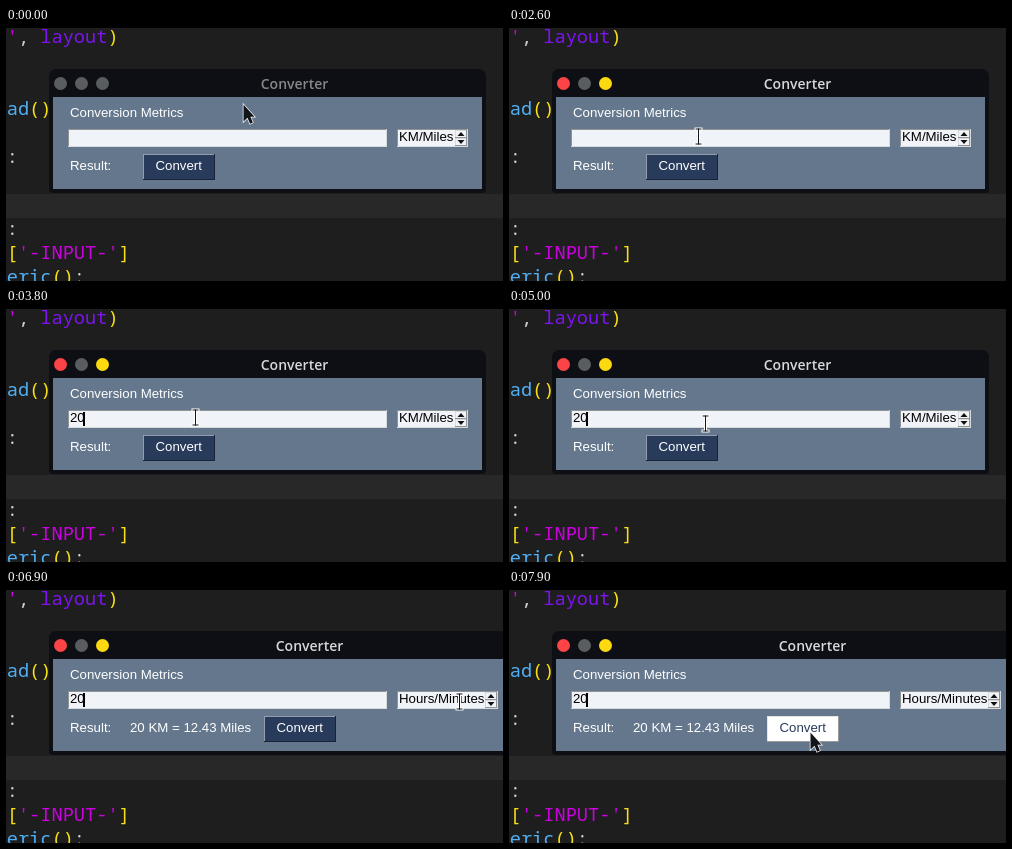
Write an HTML page with a canvas that moves like this. It is 497x253 px and loops after 8 s.

```html
<!DOCTYPE html>
<html lang="en">
<head>
<meta charset="utf-8">
<title>Converter</title>
<style>
html, body { margin: 0; width: 100%; height: 100%; overflow: hidden; background: #1e1e1e; }
canvas { display: block; }
</style>
</head>
<body>
<canvas id="stage" width="497" height="253"></canvas>
<script>
const ctx = document.getElementById('stage').getContext('2d');
const LOOP = 8000, STEP = 100;
const UI_FONT = '13.25px "Liberation Sans", Arial, sans-serif';
const CODE_FONT = '500 18.667px "Noto Sans Mono", monospace';
const TITLE_FONT = '600 14px "Open Sans", sans-serif';
const FIELD = '#f0f3f7', FIELD_DARK = '#909294', FIELD_LIGHT = '#d8dbde', NAVY = '#283b5b';

// The view starts one column into the code, so each line's first character is cut off
const CODE = `r', layout)


oad()

):


 :
 ['-INPUT-']
meric():`.split('\n');

const moves = [
  { from: 0, to: 100, x: 265, y: 68 },
  { from: 200, to: 800, x: 189, y: 108 },
  { from: 4200, to: 4400, x: 198, y: 91 },
  { from: 4600, to: 5300, x: 194, y: 132 },
  { from: 5400, to: 5800, x: 312, y: 113 },
  { from: 5800, to: 6400, x: 453, y: 111 },
  { from: 6900, to: 7700, x: 353, y: 145 },
  { from: 7700, to: 7900, x: 301, y: 142 }
];

function pointerAt(t) {
  let x = 237, y = 76;
  for (const move of moves) {
    const f = Math.min(1, Math.max(0, (t - move.from) / (move.to - move.from)));
    x += (move.x - x) * f;
    y += (move.y - y) * f;
  }
  return [Math.round(x), Math.round(y)];
}

const inside = (x, y, [left, top, w, h]) => x >= left && x < left + w && y >= top && y < top + h;

function rect(x, y, w, h, color) {
  ctx.fillStyle = color;
  ctx.fillRect(x, y, w, h);
}

function bevel([x, y, w, h], fill, topLeft, bottomRight) {
  rect(x, y, w, h, bottomRight);
  rect(x, y, w - 1, h - 1, topLeft);
  rect(x + 1, y + 1, w - 2, h - 2, fill);
}

function text(str, x, y, color, font = UI_FONT) {
  ctx.font = font;
  ctx.fillStyle = color;
  ctx.fillText(str, x, y);
}

function tokenColor(token, next) {
  if (token[0] === "'") return '#cc00e0';
  if (/[()[\]]/.test(token)) return '#f7e014';
  if (/\w/.test(token)) return next === '(' ? '#4fb0f5' : '#7d14f0';
  return '#d4d4d4';
}

function drawCode() {
  rect(0, 0, 497, 253, '#1e1e1e');
  rect(0, 166, 497, 24, '#282828');
  CODE.forEach((line, row) => {
    let x = -10.5;
    const tokens = line.match(/'[-A-Z]*'?|\w+|./g) || [];
    tokens.forEach((token, i) => {
      text(token, x, 15 + 24 * row, tokenColor(token, tokens[i + 1]), CODE_FONT);
      x += ctx.measureText(token).width;
    });
  });
}

function drawFrame(focused, extra) {
  ctx.fillStyle = '#0d0f14';
  ctx.beginPath();
  ctx.roundRect(43, 41, 437 + extra, 124, [7, 7, 4, 4]);
  ctx.fill();
  rect(47, 69, 429 + extra, 92, '#64778d');
  const grey = '#5a5d60';
  const dots = focused ? ['#fc4345', grey, '#fdd910'] : [grey, grey, grey];
  dots.forEach((color, i) => {
    ctx.fillStyle = color;
    ctx.beginPath();
    ctx.arc(54.5 + 21 * i, 55.5, 6.5, 0, 7);
    ctx.fill();
  });
  ctx.textAlign = 'center';
  text('Converter', 288.5 + extra / 2, 61, focused ? '#d6d8db' : '#85878a', TITLE_FONT);
  ctx.textAlign = 'left';
}

function drawTriangle(x, y, dir) {
  ctx.fillStyle = '#111';
  ctx.beginPath();
  ctx.moveTo(x - 3.5, y);
  ctx.lineTo(x + 3.5, y);
  ctx.lineTo(x, y + 4 * dir);
  ctx.fill();
}

function drawField(box, label) {
  bevel(box, FIELD, FIELD_DARK, FIELD_LIGHT);
  text(label, box[0] + 2, 113, '#000');
}

function drawSpinner(box, label) {
  drawField(box, label);
  const [x, y, w] = box, left = x + w - 13;
  for (const [top, dir] of [[y + 1, -1], [y + 9, 1]]) {
    bevel([left, top, 12, 8], FIELD, FIELD_LIGHT, FIELD_DARK);
    drawTriangle(left + 6, top + 4 - 2 * dir, dir);
  }
}

function drawButton(box, hover) {
  if (hover) bevel(box, '#fff', '#e6e6e6', '#999');
  else bevel(box, NAVY, '#939dad', '#182337');
  text('Convert', box[0] + 12.5, 142, hover ? NAVY : '#fff');
}

const arrowPath = new Path2D('M0 0V17L4 13.2L6.6 19.3L9.4 18L6.9 12.2H11Z');
const beamPath = new Path2D('M-2.5 -7.5H2.5M0 -7.5V7.5M-2.5 7.5H2.5');

function drawPointer(x, y, isBeam) {
  const path = isBeam ? beamPath : arrowPath;
  ctx.save();
  ctx.translate(x + 0.5, y + 0.5);
  ctx.strokeStyle = '#fff';
  ctx.lineWidth = isBeam ? 3 : 1.4;
  ctx.lineCap = 'square';
  ctx.stroke(path);
  ctx.strokeStyle = ctx.fillStyle = '#12151a';
  ctx.lineWidth = 1;
  if (isBeam) ctx.stroke(path);
  else ctx.fill(path);
  ctx.restore();
}

function draw(t) {
  const [x, y] = pointerAt(t);
  const focused = t >= 1100, converted = t >= 5500, hours = t >= 6900;
  const typed = t < 3400 ? '' : t < 3800 ? '2' : '20';
  const caretOn = focused && (t - 1100) % 900 < 600;
  const windowShown = t < 3700 || t >= 3800;
  const extra = hours ? 30 : 0;
  const input = [62, 101, 319, 18];
  const spinner = [391, 101, 71 + extra, 18];
  const button = [converted ? 258 : 137, 126, 72, 26];

  drawCode();
  if (windowShown) {
    drawFrame(focused, extra);
    text('Conversion Metrics', 64, 89, '#fff');
    drawField(input, typed);
    if (caretOn) rect(63 + 7 * typed.length, 103, 2, 14, '#000');
    drawSpinner(spinner, hours ? 'Hours/Minutes' : 'KM/Miles');
    text('Result:', 64, 142, '#fff');
    if (converted) text('20 KM = 12.43 Miles', 124, 142, '#fff');
    drawButton(button, inside(x, y, button));
  }
  const overText = inside(x, y, input) ||
    (inside(x, y, spinner) && x < spinner[0] + spinner[2] - 13);
  drawPointer(x, y, overText);
}

function tick() {
  const t = performance.now() % LOOP;
  draw(Math.floor(t / STEP) * STEP);
  requestAnimationFrame(tick);
}
tick();
</script>
</body>
</html>
```
